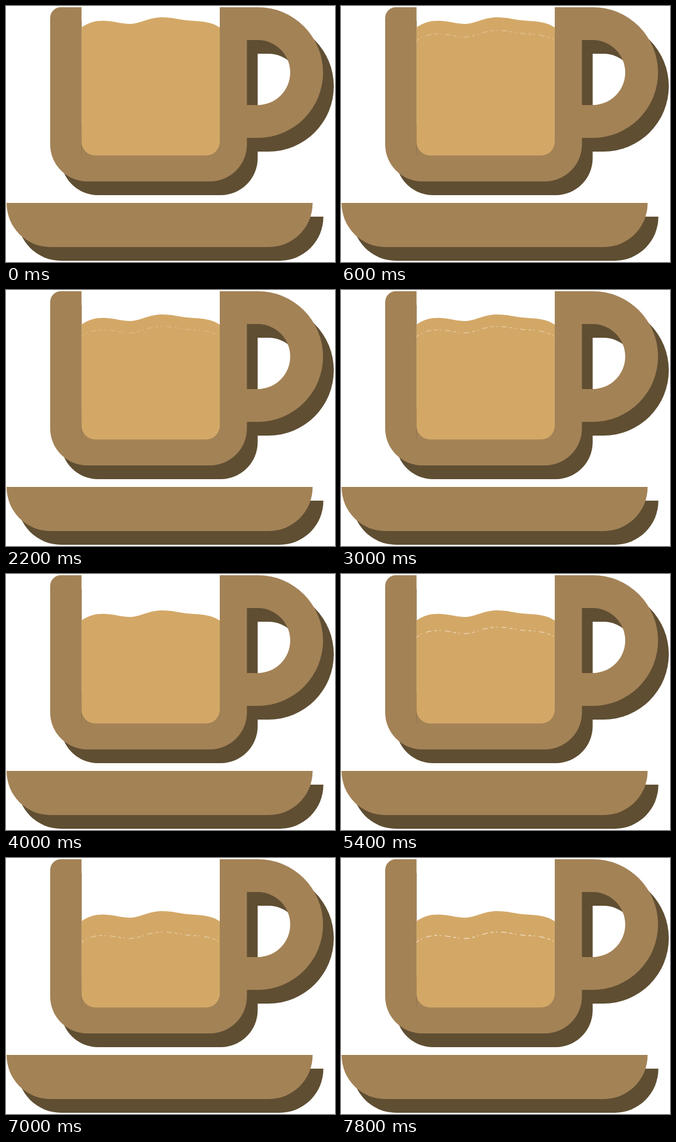
Animation of 551x429 px, one loop 8 s. Source, as an HTML page with a canvas:

```html
<!DOCTYPE html>
<html lang="en">
<head>
<meta charset="utf-8">
<title>Emptying cup</title>
<style>
html, body { margin: 0; width: 100%; height: 100%; overflow: hidden; background: #fff; }
canvas { display: block; width: 100vw; height: 100vh; }
</style>
</head>
<body>
<canvas id="stage" width="551" height="429"></canvas>
<script>
const ctx = document.getElementById('stage').getContext('2d');
const LOOP = 8000, HOLD = 2000, STEP = 200;
const BODY = '#a38256', SHADE = '#5f4e32', DRINK = '#d3a867';
const LEVELS = [19, 41, 61, 89, 124];
const LEFT = 126.5, RIGHT = 358, FLOOR = 250.5;

function cupPath() {
  const p = new Path2D();
  p.moveTo(74, 20);
  p.arcTo(74, 2, 92, 2, 18);
  p.lineTo(LEFT, 2);
  p.lineTo(LEFT, FLOOR);
  p.lineTo(RIGHT, FLOOR);
  p.lineTo(RIGHT, 2);
  p.lineTo(421.5, 2);
  p.arc(421.5, 111.5, 109.5, -Math.PI / 2, Math.PI / 2);
  p.lineTo(403.5, 221);
  p.arcTo(403.5, 294, 341, 294, 62);
  p.arcTo(74, 294, 74, 232, 62);
  p.closePath();
  // handle opening
  p.moveTo(403.5, 57);
  p.lineTo(421.5, 57);
  p.arc(421.5, 111.5, 54.5, -Math.PI / 2, Math.PI / 2);
  p.lineTo(403.5, 166);
  p.closePath();
  return p;
}

function saucerPath() {
  const p = new Path2D();
  p.moveTo(1, 330);
  p.lineTo(513.5, 330);
  p.arcTo(513.5, 404, 440, 404, 73.5);
  p.arcTo(1, 404, 1, 330, 73.5);
  p.closePath();
  return p;
}

function surfacePath(y) {
  const p = new Path2D();
  p.moveTo(LEFT, y + 17);
  p.bezierCurveTo(140, y + 7, 154, y + 5, 168, y + 6);
  p.bezierCurveTo(185, y + 7, 194, y + 11, 207, y + 11);
  p.bezierCurveTo(225, y + 11, 238, y, 262, y);
  p.bezierCurveTo(280, y, 290, y + 4, 303, y + 5);
  p.bezierCurveTo(318, y + 7, 340, y + 5, RIGHT, y + 17);
  return p;
}

function drinkPath(y) {
  const p = surfacePath(y);
  p.lineTo(RIGHT, 228);
  p.arcTo(RIGHT, FLOOR, 335, FLOOR, 23);
  p.arcTo(LEFT, FLOOR, LEFT, 228, 23);
  p.closePath();
  return p;
}

const cup = cupPath(), saucer = saucerPath();

function fill(path, color) {
  ctx.fillStyle = color;
  ctx.fill(path, 'evenodd');
}

// thin broken line where the next level will settle
function drawSeam(y, strength) {
  ctx.save();
  ctx.globalAlpha = strength;
  ctx.strokeStyle = '#fff';
  ctx.lineWidth = 1;
  ctx.setLineDash([5, 4, 2, 7, 9, 5]);
  ctx.stroke(surfacePath(y));
  ctx.restore();
}

function draw(t) {
  const tick = Math.floor(t / STEP) * STEP;
  const level = Math.floor(tick / HOLD);
  const phase = tick % HOLD / HOLD;

  ctx.fillStyle = '#fff';
  ctx.fillRect(0, 0, 551, 429);

  ctx.save();
  ctx.translate(18, 23);
  fill(cup, SHADE);
  fill(saucer, SHADE);
  ctx.restore();

  // clear the shadow from inside the cup, leaving its rounded floor
  ctx.fillStyle = '#fff';
  ctx.fillRect(LEFT, 0, RIGHT - LEFT, 200);
  ctx.fillStyle = BODY;
  ctx.fillRect(LEFT, 200, RIGHT - LEFT, FLOOR - 199);
  fill(cup, BODY);
  fill(saucer, BODY);
  fill(drinkPath(LEVELS[level]), DRINK);

  if (phase > 0) drawSeam(LEVELS[level + 1], 0.2 + 0.7 * phase);
}

function frame() {
  draw(performance.now() % LOOP);
  requestAnimationFrame(frame);
}
frame();
</script>
</body>
</html>
```
